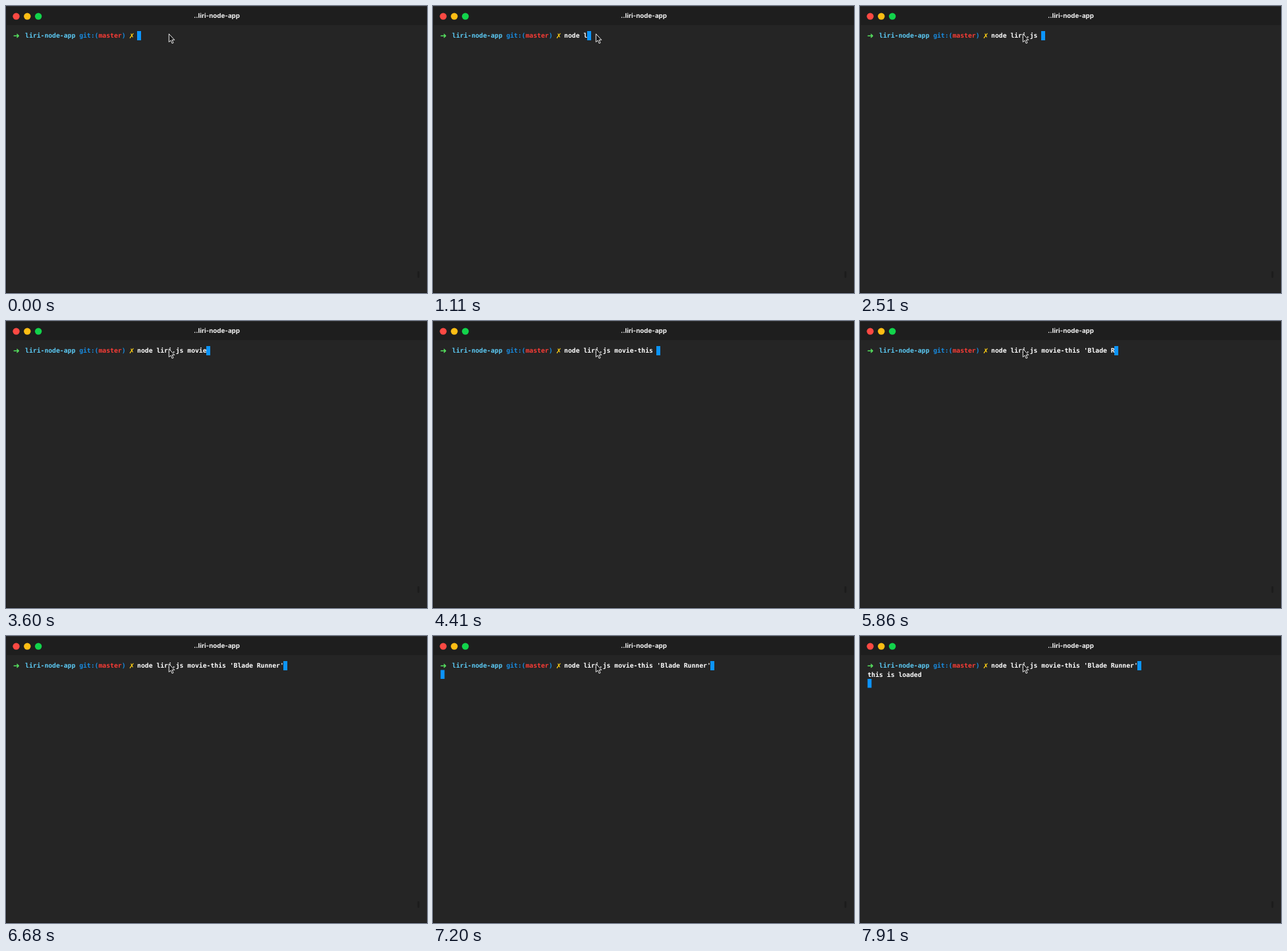
An HTML page that plays this animation: 639 px wide and 435 px high, repeating every 8 s.

```html
<!DOCTYPE html>
<html lang="en">
<head>
<meta charset="utf-8">
<title>Terminal</title>
<style>
  html, body { margin: 0; width: 100%; height: 100%; overflow: hidden; background: #252525; }
  svg { display: block; width: 639px; height: 435px; }
  text { white-space: pre; text-rendering: geometricPrecision; font-kerning: none; font-variant-ligatures: none; }
  .mono { font: 700 9.74px "DejaVu Sans Mono", "Noto Sans Mono", monospace; fill: #fff; }
  .icon { font: 700 10.5px "DejaVu Sans", sans-serif; }
  .title { font: 700 9.8px Inter, "Open Sans", sans-serif; fill: #f4f4f4; text-anchor: middle; }
  .cursor { fill: #0c94fb; }
</style>
</head>
<body>
<svg viewBox="0 0 639 435">
  <rect width="639" height="435" fill="#252525"/>
  <rect width="639" height="29" fill="#1e1e1e"/>
  <path d="M0 .5H639" stroke="#2b2b2b"/>
  <path d="M.5 29V434.5H639" fill="none" stroke="#1c1c1c"/>
  <circle cx="15.5" cy="15.6" r="5.2" fill="#fc4943"/>
  <circle cx="32.3" cy="15.6" r="5.2" fill="#fdbd14"/>
  <circle cx="49.1" cy="15.6" r="5.2" fill="#12d34b"/>
  <text class="title" x="320" y="18.3">..liri-node-app</text>
  <rect x="624.5" y="402" width="3" height="10" rx="1.5" fill="#1c1c1c"/>

  <text class="icon" x="10.8" y="49.2" fill="#56e45f" style="font-size: 12px">➜</text>
  <text class="mono" y="48.4">
    <tspan id="folder" fill="#5ccbf6">liri-node-app</tspan>
  </text>
  <g id="prompt"></g>
  <text class="icon" x="186.4" y="48.8" fill="#ffd014">✗</text>
  <text class="mono" id="command" y="48.4"></text>
  <text class="mono" id="output" x="11.5" y="61.9"></text>
  <rect class="cursor" id="promptCursor" y="38" width="6" height="14"/>
  <rect class="cursor" id="outputCursor" x="11.5" width="6" height="13.5"/>

  <path d="M247.3 42.2V54.7L250.1 52.1L252.1 56.7L254.1 55.8L252.1 51.4H255.8Z"
        fill="#1b1b1b" stroke="#e8e8e8" stroke-linejoin="round"/>
</svg>
<script>
  const LOOP = 8000, LEFT = 11.5, CELL = 5.862, LINE = 13.5, START = 32;
  const ENTER = 6940, LOADED = 7330;

  // Each burst is typed at an even pace from its first key to its last.
  const bursts = [
    { text: "node ", from: 270, to: 820 },
    { text: "liri", from: 1110, to: 1410 },
    { text: ".js", from: 1830, to: 2090 },
    { text: " mov", from: 2510, to: 2940 },
    { text: "ie-this ", from: 3340, to: 4410 },
    { text: "'Bla", from: 4670, to: 5320 },
    { text: "de Runner'", from: 5460, to: 6540 }
  ];

  const $ = id => document.getElementById(id);
  const column = n => LEFT + n * CELL;

  function addPrompt(col, text, fill) {
    const el = document.createElementNS("http://www.w3.org/2000/svg", "text");
    el.setAttribute("class", "mono");
    el.setAttribute("x", column(col));
    el.setAttribute("y", 48.4);
    el.style.fill = fill;
    el.textContent = text;
    $("prompt").append(el);
  }
  $("folder").setAttribute("x", column(3));
  addPrompt(17, "git:(", "#188be0");
  addPrompt(22, "master", "#fb3c36");
  addPrompt(28, ")", "#188be0");
  $("command").setAttribute("x", column(START));

  function typedText({ text, from, to }, t) {
    if (t < from) return "";
    const pace = (to - from) / (text.length - 1);
    return text.slice(0, 1 + Math.floor((t - from) / pace));
  }

  function draw(t) {
    const typed = bursts.map(burst => typedText(burst, t)).join("");
    $("command").textContent = typed;
    $("promptCursor").setAttribute("x", Math.floor(column(START + typed.length)));

    const loaded = t >= LOADED;
    $("output").textContent = loaded ? "this is loaded" : "";
    $("outputCursor").setAttribute("y", 38 + LINE * (loaded ? 2 : 1));
    $("outputCursor").setAttribute("visibility", t >= ENTER ? "visible" : "hidden");
  }

  const began = performance.now();
  function tick() {
    draw((performance.now() - began) % LOOP);
    requestAnimationFrame(tick);
  }
  tick();
</script>
</body>
</html>
```
